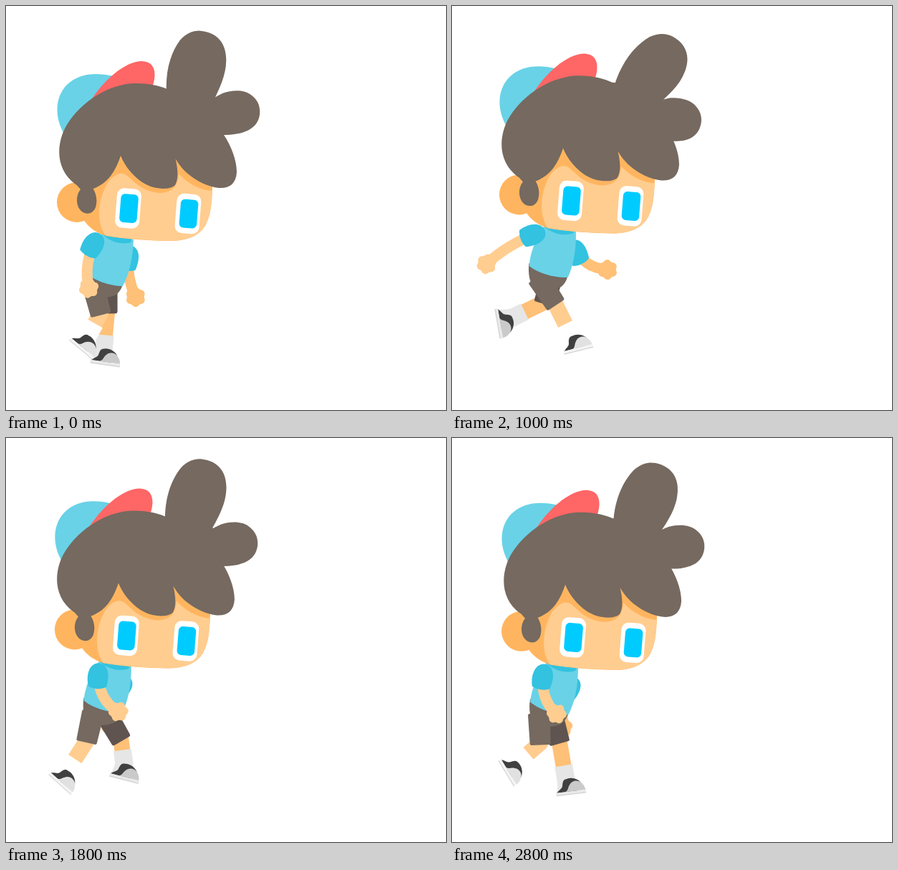
An HTML page for the animation above (3 s loop, 614x564 px).

```html
<!DOCTYPE html>
<html lang="en">
<head>
<meta charset="utf-8">
<title>Walk cycle</title>
<style>
html, body { margin: 0; width: 100%; height: 100%; overflow: hidden; background: #fff; }
svg { display: block; width: 614px; height: 564px; }
</style>
</head>
<body>
<svg id="stage" viewBox="0 0 614 564"></svg>
<script>
const LOOP = 3000, HALF = LOOP / 2, STEP = 200;
const HAIR = '#756960', SKIN = '#ffcd90', SHADE = '#ffb55f', SHIRT = '#69d2e7', SLEEVE = '#33c2e0';
const NEAR = { skin: SKIN, shorts: HAIR, sock: '#ffffff', cap: '#e1e1e1', sole: '#f4f4f4' };
const FAR = { skin: '#ffc077', shorts: '#5f5450', sock: '#e6e6e6', cap: '#cacaca', sole: '#e9e9e9' };

// swings between -1 and 1, highest at the peak time
const wave = (t, period, peak) => Math.cos(2 * Math.PI * (t - peak) / period);

function set(node, attrs) {
  for (const k in attrs) node.setAttribute(k, attrs[k]);
  return node;
}
function el(parent, tag, attrs) {
  return parent.appendChild(set(document.createElementNS('http://www.w3.org/2000/svg', tag), attrs || {}));
}
const group = parent => el(parent, 'g');
const shape = (parent, d, fill) => el(parent, 'path', { d, fill });
const line = (parent, stroke, width) =>
  el(parent, 'path', { fill: 'none', stroke, 'stroke-width': width, 'stroke-linejoin': 'round' });

function makeLeg(parent, c) {
  const g = group(parent);
  const leg = { g, skin: line(g, c.skin, 22), sock: line(g, c.sock, 25), foot: group(g) };
  el(leg.foot, 'circle', { cx: 16, cy: -22, r: 12.5, fill: c.sock });
  shape(leg.foot, 'M1,-4C4,-12 3,-18 4,-23L28,-22V-4Z', c.sock);
  shape(leg.foot, 'M1,-4C6,-9 9,-9 10,-13C11,-18 12,-22 17,-22C23,-24 32,-21 36,-15L30,-4Z', '#404040');
  shape(leg.foot, 'M13,-4C18,-6 17,-10 20,-13C24,-19 32,-19 36,-15C40,-11 41,-8 41.5,-4Z', c.cap);
  el(leg.foot, 'rect', { x: 0, y: -4, width: 42, height: 4, rx: 1, fill: c.sole });
  el(leg.foot, 'path', { d: 'M0,0H42', stroke: '#c8c8c8', 'stroke-width': 0.9 });
  leg.thigh = set(line(g, c.shorts, 5), { fill: c.shorts });
  return leg;
}

function poseLeg(leg, t, hx, hy) {
  const bounce = wave(t, HALF, 0);
  const kx = 128 + 21 * wave(t, LOOP, 660), ky = 420 + 9 * bounce;
  const ax = 117 + 56 * wave(t, LOOP, 770), ay = 456 + 13 * wave(t, LOOP, 1190) + 14 * bounce;
  const turn = 30 + 48 * wave(t, LOOP, 2410) - 6 * bounce;

  const shin = Math.hypot(kx - ax, ky - ay), thigh = Math.hypot(kx - hx, ky - hy);
  const nx = (ky - hy) / thigh, ny = (hx - kx) / thigh;
  const side = (x, y, w) => `${x + nx * w},${y + ny * w}`;
  set(leg.skin, { d: `M${hx},${hy}L${kx},${ky}L${ax},${ay}` });
  set(leg.sock, { d: `M${ax},${ay}l${(kx - ax) / shin * 19},${(ky - ay) / shin * 19}` });
  set(leg.foot, { transform: `translate(${ax} ${ay}) rotate(${turn}) translate(-16 22)` });
  set(leg.thigh, { d: `M${side(hx, hy, 13)}L${side(kx, ky, 12)}L${side(kx, ky, -12)}L${side(hx, hy, -13)}Z` });
}

function makeArm(parent, c) {
  const g = group(parent);
  const arm = { skin: line(g, c.skin, 15), hand: group(g) };
  el(arm.hand, 'circle', { r: 12, fill: c.skin });
  for (let i = 0; i < 6; i++)
    el(arm.hand, 'circle', { cx: 8.5, r: 5.5, fill: c.skin, transform: `rotate(${i * 60 + 25})` });
  arm.sleeve = shape(g, 'M-11,1C-11,-13 3,-17 22,-12C26,-5 26,5 22,13C8,17 -9,14 -11,1Z', SLEEVE);
  return arm;
}

function poseArm(arm, sx, sy, ex, ey, hx, hy) {
  const angle = (y, x) => Math.atan2(y, x) * 180 / Math.PI;
  set(arm.skin, { d: `M${sx},${sy}Q${ex},${ey} ${hx},${hy}` });
  set(arm.hand, { transform: `translate(${hx} ${hy}) rotate(${angle(hy - ey, hx - ex)})` });
  set(arm.sleeve, { transform: `translate(${sx} ${sy}) rotate(${angle(ey - sy, ex - sx)})` });
}

function eye(parent, cx, cy) {
  const box = (x, w, h, rx, fill) => el(parent, 'rect', {
    x: x - w / 2, y: cy - h / 2, width: w, height: h, rx, fill, transform: `rotate(4.5 ${cx} ${cy})`
  });
  box(cx, 34, 55.5, 10, '#fff');
  box(cx + 1, 24.5, 40, 6, '#00cbff');
}

const stage = document.getElementById('stage');
const farArm = makeArm(stage, FAR);
const farLeg = makeLeg(stage, FAR);
const nearLeg = makeLeg(stage, NEAR);
set(farLeg.g, { transform: 'translate(17 -2)' });

const body = group(stage);
shape(body, 'M110,368C107,384 110,398 116,405C128,409 142,408 152,404C158,400 162,394 163,387Z', HAIR);
shape(body, 'M134,317C121,335 112,354 110,372C122,383 145,391 163,391C171,376 177,355 178,326Z', SHIRT);
shape(body, 'M133,317C143,328 158,334 174,330L177,322Z', SLEEVE);
const nearArm = makeArm(stage, NEAR);

const head = group(stage);
shape(head, 'M82,180C67,156 68,127 85,110C101,94 125,92 150,98L120,134Z', SHIRT);
shape(head, 'M117,134C135,105 165,77 190,77C210,78 210,97 204,114Z', '#ff6666');
el(head, 'circle', { cx: 99, cy: 274, r: 28, fill: SHADE });
shape(head, 'M104,200H290C289,240 288,258 286,280C282,312 265,327 232,328C200,328 165,325 140,321C126,317 115,309 108,298Z', SHADE);
shape(head, 'M139,320.5C127,305 127,275 140,250C148,237 158,231 166,235C176,240 185,259 215,261C232,260 240,252 241,234C255,250 275,258 288,258C287,275 286,292 278,307C268,323 250,328 228,328C192,327 165,325 139,320.5Z', SKIN);
const sideTuft = shape(head, 'M250,145C275,138 288,128 302,121C315,116 332,115 342,123C352,130 355,140 354,150C352,166 340,173 325,177C300,182 275,180 250,170Z', HAIR);
const topTuft = shape(head, 'M226,140C218,100 226,68 240,48C250,36 260,34 268,34C290,35 303,48 305,70C307,92 298,113 285,140Z', HAIR);
shape(head, 'M97,249C74,232 70,205 78,181C87,153 122,118 165,109.5C190,105 215,111 228,117L290,126L304,180C314,195 322,215 322,232C321,248 312,255 297,254C275,252 248,235 236.5,213C240,228 241,241 236,250C228,258 205,256 190,246C177,237 166,224 160,209C153,230 143,247 122,255Z', HAIR);
shape(head, 'M96,247L104,256C98,263 97,276 103,284C109,292 121,292 125,281C128,271 126,262 121,254Z', HAIR);
eye(head, 170.5, 282.5);
eye(head, 254, 290);

function draw(t) {
  const rise = Math.abs(Math.sin(Math.PI * t / HALF)) ** 1.25;
  const bounce = wave(t, HALF, 0), swing = wave(t, LOOP, 2260);
  const dx = -1.5 * rise, dy = -12.7 * rise;

  poseLeg(farLeg, t + HALF, 123 + dx, 393 + dy);
  poseLeg(nearLeg, t, 122 + dx, 391 + dy);
  poseArm(farArm, 167 - 7 * swing + 5 * bounce, 340 + 5 * bounce,
    160 - 33 * swing + 8 * bounce, 370 + 8 * bounce,
    172 - 57 * swing + 10 * bounce, 386 + 9 * swing + 20 * bounce);
  poseArm(nearArm, 125 + 6.5 * swing, 322 + 3 * swing + 5 * bounce,
    107 + 36 * swing, 353 + 18 * swing + 6 * bounce,
    114 + 75 * swing, 373 + 21 * wave(t, HALF, 30));
  set(body, { transform: `translate(${dx} ${dy}) rotate(${-4 * rise} 137 390)` });
  set(head, { transform: `translate(${-6 * rise} ${dy})` });

  // the loose hair lags behind the head
  const lean = 12 + 11.5 * wave(t, HALF, 920) + 2.5 * wave(t, HALF / 2, 270);
  set(topTuft, { transform: `rotate(${lean} 248 142)` });
  set(sideTuft, { transform: `translate(0 ${8 * rise}) rotate(${lean * 0.6} 262 150)` });
}

const start = performance.now();
function tick() {
  const t = (performance.now() - start) % LOOP;
  draw(Math.floor(t / STEP) * STEP);
  requestAnimationFrame(tick);
}
tick();
</script>
</body>
</html>
```
